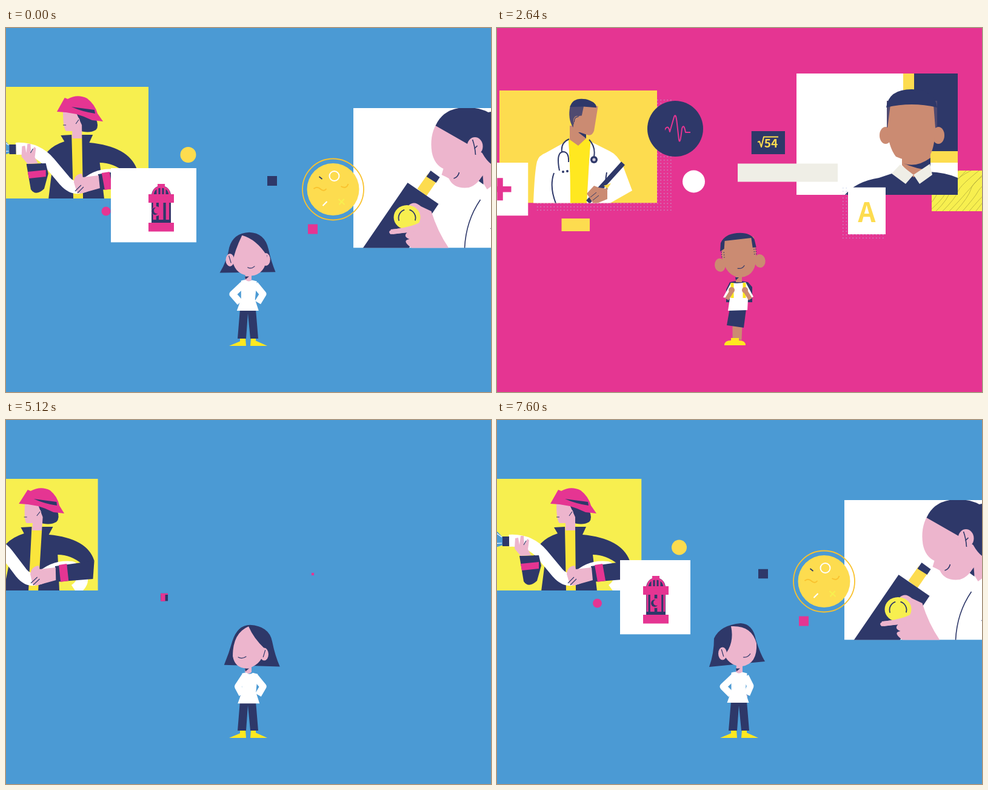
An HTML page with a canvas that plays this animation: 800 by 600 pixels, repeating every 7.68 s.

```html
<!DOCTYPE html>
<html lang="en">
<head>
<meta charset="utf-8">
<title>Future jobs</title>
<style>
html, body { margin: 0; width: 100%; height: 100%; overflow: hidden; background: #4b9ad4; }
canvas { display: block; }
</style>
</head>
<body>
<canvas id="stage" width="800" height="600"></canvas>
<script>
const g = document.getElementById('stage').getContext('2d');
const BLUE = '#4b9ad4', PINK = '#e53592', NAVY = '#2e3869', GOLD = '#fddc4f', LEMON = '#f7ef4f',
  SUN = '#ffe820', ROSE = '#edb5cd', BROWN = '#cb8b72', AMBER = '#f9c22e', PLUM = '#504a70',
  PAPER = '#efeee6', WHITE = '#fff';
const FONT = '"Noto Sans CJK SC", "Noto Sans CJK JP", sans-serif';
const LOOP = 7680, STEP = 80, SWAP = 4400;
g.lineJoin = 'round';

// Drawing helpers
const fill = (c, d) => { g.fillStyle = c; g.fill(new Path2D(d)); };
const line = (c, w, d) => { g.strokeStyle = c; g.lineWidth = w; g.stroke(new Path2D(d)); };
const box = (c, x, y, w, h) => { g.fillStyle = c; g.fillRect(x, y, w, h); };
const oval = (c, x, y, rx, ry = rx) => {
  g.fillStyle = c; g.beginPath(); g.ellipse(x, y, Math.max(rx, 0), Math.max(ry, 0), 0, 0, 7); g.fill();
};
const ring = (c, w, x, y, r, a = 0, b = 7) => {
  g.strokeStyle = c; g.lineWidth = w; g.beginPath(); g.arc(x, y, Math.max(r, 0), a, b); g.stroke();
};
const label = (c, size, x, y, text) => {
  g.font = `bold ${size}px ${FONT}`; g.textAlign = 'center'; g.fillStyle = c; g.fillText(text, x, y);
};
const group = fn => { g.save(); fn(); g.restore(); };
const move = (x, y, fn) => group(() => { g.translate(x, y); fn(); });
const turn = (x, y, deg, fn) => group(() => {
  g.translate(x, y); g.rotate(deg * Math.PI / 180); g.translate(-x, -y); fn();
});
const panel = (c, x, y, w, h, fn) => {
  if (w <= 0 || h <= 0) return;
  group(() => {
    g.beginPath(); g.rect(x, y, w, h); g.clip();
    box(c, x, y, w, h); fn();
  });
};
const dots = (x0, y0, x1, y1) => {
  for (let x = x0; x < x1; x += 5.5)
    for (let y = y0; y < y1; y += 5.5) box('rgba(185,195,230,.6)', x, y, 1.5, 1.5);
};

// Motion helpers: eased keys as time, value pairs, and blending of like paths
const key = (s, ...k) => {
  if (s <= k[0]) return k[1];
  for (let i = 2; i < k.length; i += 2) if (s < k[i]) {
    const p = (s - k[i - 2]) / (k[i] - k[i - 2]);
    return k[i - 1] + (k[i + 1] - k[i - 1]) * p * p * (3 - 2 * p);
  }
  return k[k.length - 1];
};
const NUM = /-?[\d.]+/g;
const mix = (a, b, k) => {
  const n = b.match(NUM);
  let i = 0;
  return a.replace(NUM, v => +v + (n[i++] - v) * k);
};

function girl(s) {
  const yaw = key(s, 1200, 0, 1520, -1, 2320, -1, 2640, 1, 3920, 1, 4000, .15, 4320, -.6);
  const pose = (l, f, r) => yaw < 0 ? mix(f, l, -yaw) : mix(f, r, yaw);
  const ear = (l, f, r, lean) => {
    const [x, y] = pose(l, f, r).split(',').map(Number);
    oval(ROSE, x, y, 7, 10.5);
    line(NAVY, 1.2, `M${x - 3 * lean},${y + 5} L${x + 3 * lean},${y - 7}`);
  };
  const settle = key(s, 240, 0, 800, 1);
  move(0, settle * 2.5, () => {
    fill(SUN, 'M368,521.5 L386,514 V509 H395 L396,521.5Z M431,521.5 L412,513 V509 H404 L403,521.5Z');
    fill(NAVY, 'M386,461 H412 L416,509.5 H403 L399,468 L396,509.5 H382Z');
    oval(ROSE, 382 + settle * 8, 455, 4); oval(ROSE, 418 - settle * 10, 453, 5, 4);
    fill(ROSE, 'M395,402 H405 V413 Q400,418 394,413Z');
    fill(NAVY, 'M394,407 H401 L395,412Z');
    const spread = settle * 2;
    line(WHITE, 11, pose('M394,420 L384,437 L390,450', `M391,420 L${376 - spread},436 L386,450`, 'M391,420 L373,437 L386,450'));
    line(WHITE, 11, pose('M411,421 L424,437 L416,451', `M411,420 L${423 + spread},436 L416,450`, 'M410,420 L418,436 L412,450'));
    move(-1.5 * yaw, yaw < 0 ? -1.5 * yaw : 0, () =>
      fill(WHITE, 'M388,414 Q394,412 396,413 Q400,417 406,413 L414,415 L411,445 L417,463.5 H381 L388,444Z'));
  });
  fill(NAVY, pose('M361,404 Q368,385 374,365 Q383,338 403,338 Q435,340 440,365 Q445,390 453,407Z',
    'M353,403 Q366,383 370,362 Q376,338 401,337 Q428,338 434,365 Q438,385 445,403Z',
    'M350,407 Q358,385 358,360 Q368,338 402,335 Q422,336 427,362 Q434,385 442,398Z'));
  ear('384,385', '369,382', '372,385', -.6);
  ear('425,387', '431,381', '416,385', .6);
  fill(ROSE, pose('M402,340 Q408,362 425,376 Q424,400 400,409 Q378,412 374,390 Q374,348 402,340Z',
    'M390,342 Q412,350 431,377 Q428,407 404,409 Q378,408 374,385 Q374,368 390,342Z',
    'M386,340 Q420,338 428,368 Q430,402 404,406 Q385,406 375,388 Q392,368 386,340Z'));
  line(NAVY, 1.2, pose('M380,390 Q387,394 394,389', 'M397,395 Q403,399 409,394', 'M406,391 Q414,392 418,385'));
}

function boy(s) {
  const walk = .5 - .5 * Math.cos((s - 4960) / 320 * Math.PI), rest = key(s, 6000, 0, 6600, 1);
  const pose = (a, b, c) => mix(mix(a, b, walk), c, rest);
  const shoe = (d, side) => {
    const [x, y] = d.split(',').map(Number);
    move(x, y, () => { g.scale(side, 1); fill(SUN, 'M0,0 V-12 H10 V-8 Q21,-8 21,0Z'); });
  };
  line(BROWN, 9, pose('M397,490 L398,514', 'M395,490 L396,514', 'M393,490 L393,514'));
  line(BROWN, 9, pose('M407,490 L408,516', 'M408,486 L407,510', 'M400,490 L399,514'));
  shoe(pose('407,521.5', '405,525', '396,523'), -1);
  shoe(pose('403,526', '400,519', '389,523'), 1);
  fill(NAVY, pose('M386,462 L414,462 L418,492 L389,494Z', 'M385,462 L414,461 L418,488 L388,494Z',
    'M384,462 L411,463 L407,494 L379,490Z'));
  move(-2 * rest, rest, () => {
    fill(NAVY, 'M386,418 Q400,414 416,418 L423,426 V451 H380 V430Z');
    fill(BROWN, 'M396,406 H406 V418 H396Z');
    fill(NAVY, 'M395,410 H401 L396,415Z');
    fill(WHITE, 'M388,419 Q400,421 412,418 L425,442 L416,446 L415,464 L383,465 L386,445 L375,443Z');
    line(SUN, 5, 'M390,419 V444 M410,419 V444');
    line(BROWN, 7, 'M381,446 L389,433 M420,446 L412,433');
    oval(BROWN, 389, 431, 5); oval(BROWN, 411, 431, 5);
  });
  move(-2 * rest, 0, () => turn(402, 412, key(s, 4960, 4, 5920, 3, 6640, -5), () => {
    oval(BROWN, 372, 388, 9, 11); oval(BROWN, 438, 387, 9, 11);
    fill(BROWN, 'M380,346 H431 L433,372 Q432,411 405,411 Q379,409 376,372Z');
    fill(NAVY, 'M374,366 L376,352 Q384,338 404,338 Q426,338 432,351 L434,364 L428,364 L427,348 L383,349 L381,362Z');
    for (const x of [376, 380, 430, 433])
      for (let y = 366; y < 378; y += 4) oval(NAVY, x, y + x % 3, .8);
    line(NAVY, 1.2, 'M400,396 Q408,398 412,392');
  }));
}

function firefighter(s) {
  const k = key(s, 1200, 1.2, 2240, 1, 3920, 0, 4000, -.13);
  g.transform(1, 0, -.06 * k, 1, 24 * k, 0);
  fill(BLUE, 'M-40,142 L10,194 V206 L-40,222Z');
  line(WHITE, 1.2, 'M-30,166 L8,193 M-30,205 L8,203');
  fill(NAVY, 'M118,141 L152,149 Q158,162 152,168 Q140,175 122,168Z');
  fill(ROSE, 'M98,137 L120,140 L129,160 V184 H113 V170 H103 Q98,166 98,137Z');
  oval(ROSE, 121, 154, 5, 7);
  line(NAVY, 1.1, 'M119,158 L124,151 M98,160 L103,160');
  fill(PINK, 'M88,138 L101,115 L106,117 Q122,108 138,116 Q151,126 155,141 L164,154 L146,152 Q118,138 88,138Z');
  fill(NAVY, 'M112,130 L150,135 L151,141 Q130,138 112,130Z');
  fill('#fae53c', 'M113,182 H130 L132,281 H111Z');
  fill(NAVY, 'M94,177 L112,176 L114,282 H73 L80,228 L60,228 Q66,198 100,187Z');
  fill(NAVY, 'M129,176 H147 L141,189 Q205,195 219,232 L200,238 Q180,222 158,222 L165,282 H130Z');
  line(WHITE, 20, 'M20,199 Q54,197 75,222 L100,252 Q114,268 132,261 Q152,240 182,243 Q215,262 190,280');
  fill(NAVY, 'M9,192 H20 V208 H9Z');
  fill(NAVY, 'M37,224 L69,223 L73,240 L66,265 Q52,278 44,266Z');
  fill(PINK, 'M39,237 L69,234 V245 L41,248Z');
  fill(NAVY, 'M155,241 L219,232 V262 L157,267Z');
  fill(PINK, 'M161,239 L174,237 L179,265 L166,267Z');
  fill(ROSE, 'M30,195 L35,194 L37,206 L39,191 L44,191 L45,206 L50,196 L53,198 L51,213 L56,223 L39,224 L29,212Z');
  fill(ROSE, 'M115,254 Q116,241 128,240 L130,246 L156,243 L158,264 L126,273 L120,271Z');
  line(NAVY, 1.1, 'M44,206 L48,199 M117,269 L127,259 M121,272 L131,262');
}

function hydrant(s, x) {
  const a = (s - 2240) / 672 * Math.PI;
  const nozzle = phase => {
    const sx = 23 * Math.cos(a + phase), front = Math.sin(a + phase);
    if (front < -.1) return;
    fill(PINK, `M${x},297 L${x + sx},297 V308 L${x},308Z`);
    oval(PINK, x + sx, 302, 4 + 4 * front, 8);
    if (front > .1) oval(NAVY, x + sx - 2, 302, 6 * front, 6);
    if (front > .1) oval(PINK, x + sx + 1, 301, 5 * front, 5);
  };
  box(NAVY, x - 16, 285, 32, 38);
  for (let i = 0; i < 4; i++) {
    const b = ((i + .5) / 4 * Math.PI + a) % (Math.PI / 4) + i * Math.PI / 4;
    const w = 7.5 * Math.sin(b);
    box(PINK, x - 15 * Math.cos(b) - w / 2, 288, w, 28);
  }
  nozzle(0); nozzle(Math.PI);
  fill(NAVY, `M${x - 16},275 Q${x - 14},261 ${x},260 Q${x + 14},261 ${x + 16},275Z`);
  line(PINK, 3, `M${x - 14},275 Q${x - 12},262 ${x},262 Q${x + 12},262 ${x + 14},275 M${x - 6},275 V263 M${x},275 V260 M${x + 6},275 V263`);
  box(PINK, x - 6, 257, 12, 5);
  box(PINK, x - 21, 274, 42, 14); box(PINK, x - 21, 321, 42, 14.5);
}

function scientist() {
  fill(ROSE, 'M700,200 L728,222 L736,248 L712,266 L698,243Z');
  fill(NAVY, 'M698,252 L705,243 L706,258Z');
  fill(GOLD, 'M718,261 L735,247 L764,242 V250 Q738,252 718,261Z');
  line(NAVY, 1.6, 'M735,254 Q750,249 764,249 M701,283 Q677,318 675,363 M727,320 L724,363 M718,330 L725,336');
  fill(ROSE, 'M628,159 Q617,178 621,205 Q625,225 640,232 L637,242 Q644,245 649,248 Q657,266 682,263 Q698,258 705,240 L712,200 L690,178Z');
  fill(NAVY, 'M627,161 Q640,132 676,131 Q700,131 714,139 Q732,134 740,147 Q748,159 764,157 V197 Q745,228 726,228 Q714,224 704,206 L690,197Z');
  oval(ROSE, 692, 195, 13, 15);
  line(NAVY, 1.6, 'M688,184 Q692,195 693,209 M691,199 L696,194 M657,248 Q664,246 666,238');
  fill(GOLD, 'M597,265 L614,241 L630,251 L612,277Z');
  fill(NAVY, 'M619,235 L634,246 L628,255 L612,245Z');
  fill(NAVY, 'M507,363 L581,255 L632,290 L583,363Z');
  fill(ROSE, 'M583,292 Q592,284 603,294 L620,302 Q630,335 649,363 H588 Q570,350 584,348 Q573,344 580,337 L553,340 Q547,335 556,332 L585,328Z');
  oval(LEMON, 580, 312, 22, 20);
  ring(NAVY, 1.8, 580, 313, 14, 2.8, 4.4); ring(NAVY, 1.8, 580, 313, 14, 5, 6.6);
  fill(ROSE, 'M553,332 Q585,329 602,320 L606,334 L556,340Z');
}

function pupil() {
  box(NAVY, 688, 75, 72, 128); box(GOLD, 670, 75, 18, 28); box(GOLD, 714, 203, 46, 19);
  fill(NAVY, 'M573,276 Q592,253 630,247 L660,237 H712 Q740,238 760,247 V276Z');
  fill(BROWN, 'M668,200 H715 V232 L687,246 L668,226Z');
  fill(NAVY, 'M668,222 Q690,232 715,214 V234 Q695,234 668,222Z');
  fill(PAPER, 'M651,240 L665,225 L687,242 L674,257Z M687,242 L714,224 L718,242 L697,257Z');
  oval(BROWN, 641, 177, 10, 14); oval(BROWN, 728, 177, 10, 14);
  fill(PLUM, 'M643,120 H726 V164 H643Z');
  fill(BROWN, 'M649,126 H720 L723,165 Q722,200 712,213 Q690,226 658,212 Q645,195 644,165Z');
  fill(NAVY, 'M642,131 Q646,101 684,101 Q722,101 726,131 Q684,121 642,131Z');
}

function doctor(s) {
  const k = key(s, 5920, 0, 6560, 1);
  const x1 = 213 - 5 * k, y1 = 246 - 29 * k, x2 = 186 - 36 * k, y2 = 286 - 5 * k;
  fill(WHITE, 'M60,283 Q62,230 66,214 Q69,204 80,200 L118,179 L124,283Z');
  fill(WHITE, mix('M154,181 L190,197 Q201,203 204,213 L222,283 L184,283 L148,283Z',
    'M154,181 L186,197 Q199,203 208,222 L223,262 L186,283 L148,283Z', k));
  fill(SUN, 'M118,178 H155 Q150,220 148,283 H121 Q121,220 118,178Z');
  fill(BROWN, 'M120,155 H147 V176 L134,188 L120,178Z');
  fill(NAVY, 'M134,166 H147 V176Z');
  turn(133, 180, 12 * k, () => {
    fill(BROWN, 'M128,121 L154,117 L156,158 Q155,168 146,167 L121,164 V140Z');
    fill(PLUM, 'M109,126 L131,122 V138 Q120,140 121,160 Q109,148 109,126Z');
    fill(NAVY, 'M109,128 Q110,111 132,110 Q150,111 152,120 L130,123Z');
    oval(BROWN, 124, 147, 5, 7);
    line(NAVY, 1.1, 'M121,151 Q119,142 126,141');
  });
  line(NAVY, 2, 'M119,177 Q105,183 107,198 M103,229 Q97,199 109,198 Q119,198 118,215 M152,178 Q163,190 160,206 M94,233 Q86,255 97,283 M181,232 Q177,252 182,260');
  oval(NAVY, 109, 231, 2); oval(NAVY, 116, 230, 2);
  oval(NAVY, 160, 211, 6); oval('#cfc9dd', 160, 211, 2.6);
  line(NAVY, 8, `M${x1},${y1} L${x2},${y2}`);
  if (k > .3) {
    fill(GOLD, `M${x2 + 26},${y2 - 27} L${x2 + 38},${y2 - 31} L${x2 + 32},${y2 - 22}Z`);
    fill(BROWN, `M${x2 - 2},${y2 - 14} L${x2 + 10},${y2 - 27} L${x2 + 18},${y2 - 24} L${x2 + 32},${y2 - 22} V${y2 - 5} L${x2 + 10},${y2 + 4}Z`);
    line(NAVY, 1, `M${x2 + 4},${y2 - 8} L${x2 + 14},${y2 - 16} M${x2 + 8},${y2 - 3} L${x2 + 18},${y2 - 11}`);
  }
}

function dish(s) {
  if (s < 2160 || s > 6240) return;
  const x = key(s, 4000, 539.5, 4900, 533, 5640, 533, 5920, 768, 6200, 880);
  const y = key(s, 2240, 186, 2640, 266), r = key(s, 2160, 4, 2240, 14, 2640, 50.5);
  ring(AMBER, r < 20 ? 1 : 1.8, x, y, r);
  const size = key(s, 2320, 0, 2800, 43);
  if (!size) return;
  move(x, y, () => {
    oval(GOLD, 0, 0, size);
    g.beginPath(); g.arc(0, 0, size, 0, 7); g.clip();
    if (s > 4500 && s < 5720) {
      ring(WHITE, 3.5, -17, -16, 16);
      line(AMBER, 3, 'M7,17 Q14,24 20,19 Q26,17 30,10');
      return;
    }
    g.translate(0, s > 5000 ? -20 : 0);
    ring(WHITE, 2, 2, -22, 8);
    line(AMBER, 2, 'M-32,-1 Q-26,-6 -20,0 Q-15,4 -11,-1 M13,-5 Q22,0 25,-9');
    line(NAVY, 1.8, 'M-23,-21 L-18,-17');
    line(WHITE, 2.2, 'M-17,27 L-10,20');
    move(s > 5000 ? 13 : 0, 5, () => line(LEMON, 2, 'M9,11 L19,20 M18,11 L10,20'));
  });
}

function leftSide(s) {
  const sun = key(s, 1440, 0, 1680, 12.5, 3920, 12.5, 4000, 13, 4960, 18.5);
  if (s < 4480) {
    const x = key(s, 1200, -245, 1600, 0, 3920, .5, 4000, -3, SWAP, -260);
    panel(LEMON, x - 20, 97, 258, 184, () => { g.translate(Math.min(x + 1, 0), 0); firefighter(s); });
    oval(PINK, key(s, 2240, 160, 3920, 165.5, 4000, 165, SWAP, 60), 302, key(s, 1520, 0, 1760, 7.5, 4000, 7.5, SWAP, 0));
  } else {
    const y = 97 + (s - 4960) / 1680 * 6;
    if (s > 4800) dots(66, 118, 289, 303);
    panel(GOLD, key(s, SWAP, -270, 4880, 4), y, 260, 185.5, () => {
      g.translate(key(s, SWAP, -274, 4880, 0), y - 97); doctor(s);
    });
    move(key(s, 4960, 306, 5920, 287.5, 6640, 294), 166, () => {
      oval(NAVY, 0, 0, key(s, 4480, 0, 4880, 46));
      g.setLineDash([key(s, 5640, 0, 5920, 46, 6400, 190), 400]);
      line(PINK, 2, 'M-31,5 H-19 Q-12,-10 -9,5 L-2,-19 Q1,-28 3,-8 L6,18 Q8,28 11,0 Q14,-10 17,6 H25');
      g.setLineDash([]);
      box(NAVY, -33, -4, key(s, 6160, 0, 6560, 16), 14);
    });
    box(GOLD, key(s, 4500, -60, 4960, 93, 5920, 102, 6640, 106.5), 314, 46.5, 21);
  }
  oval(s < SWAP ? GOLD : WHITE, key(s, 2240, 299.5, 4000, 300.5, 4960, 322.5, 5920, 320.5, 6640, 324.5),
    key(s, 2240, 214.5, 3920, 210, 4000, 209, 4960, 253.5, 5920, 245.5, 6640, 253), sun);

  // The card that holds the hydrant and later the cross
  const l = key(s, 1360, 261, 1760, 203, 3920, 203, 4000, 173, 4720, -57, 4960, -57, 5920, -42);
  const r = key(s, 1360, 261, 1760, 319, 3920, 319, 4000, 314, 4720, 65, 4960, 65, 5920, 51.5);
  const t = key(s, 1360, 292, 1760, 231, 4000, 231, 4960, 229.5, 5920, 237, 6640, 222);
  const b = key(s, 1360, 292, 1760, 353.5, 4000, 353.5, 4960, 354.5, 5920, 325, 6640, 309.5);
  panel(WHITE, l, t, r - l, b - t, () => {
    if (s < SWAP) return hydrant(s, key(s, 3920, 262, 4000, 256, SWAP, 150));
    const arm = key(s, 4960, 34, 5920, 18.5), w = arm / 3.9, y = (t + b) / 2;
    box(PINK, 5 - arm, y - w, arm * 2, w * 2); box(PINK, 5 - w, y - arm, w * 2, arm * 2);
  });
}

function rightSide(s) {
  const grow = key(s, 2160, 0, 2240, .05, 2640, 1);
  const x = key(s, 4000, 573, 4800, 495, 5680, 495, 5920, 494), y = key(s, 5640, 132, 5920, 118, 6480, 75);
  const w = key(s, 5680, 268, 5920, 266), h = key(s, 5680, 230.5, 5920, 229, 6480, 200);
  const swap = key(s, 5980, 0, 6440, 1);
  if (s > 4880 && s < 5600) dots(534, 363, 728, 378);
  if (s > 6080) panel(LEMON, key(s, 6100, 810, 6500, 717), 235, 90, 67, () => {
    for (let i = 0; i < 14; i++) {
      const o = i * 11;
      line('#b3ad3c', .8, `M${690 + o},303 Q${712 + o},${285 - i} ${716 + o},${265 + i % 3 * 5} T${755 + o},232`);
    }
  });
  panel(WHITE, x + w * .52 * (1 - grow), y + h / 2 * (1 - grow), w * grow, h * grow, () => {
    if (swap < 1) move(key(s, 4000, 81.5, 4800, 0, 5680, 0, 5920, -4), key(s, 5680, 0, 5920, -7) - swap * 260, scientist);
    if (swap > 0) move(0, y - 75 + (1 - swap) * 230, () => { box(WHITE, 494, 75, 266, 200); pupil(); });
  });
  dish(s);

  if (s < SWAP) {
    const p = key(s, 1360, 0, 1600, 8);
    box(PINK, 506 - p, key(s, 2240, 254, 2640, 331.5) - p, p * 2, p * 2);
  }
  const pop = key(s, 2320, 0, 2560, 1);
  const nx = key(s, 5920, 431, 6480, 419.5), ny = key(s, 2560, 245.5, 3920, 245.5, 4000, 244, 4880, 170);
  panel(NAVY, nx + 8 * (1 - pop), ny + 8 * (1 - pop), key(s, 5560, 16, 5900, 55.5) * pop, key(s, 5560, 16, 5900, 38) * pop, () => {
    if (s < 6080) return;
    g.globalAlpha = key(s, 6080, 0, 6400, 1);
    g.translate(nx - 419.5, 0);
    line(GOLD, 2, 'M430,188 L433,187 L436,196 L440,179.5 H464');
    label(GOLD, 19, 452, 197, '54');
  });
  if (s < 5880) return;
  const bar = key(s, 5920, 561, 6400, 397);
  box(PAPER, bar, 223.5, 562 - bar, 30);
  if (s > 6320) dots(570, 263, 640, 350);
  const cw = key(s, 5880, 13, 5920, 15, 6400, 62), ch = key(s, 5880, 13, 5920, 15, 6400, 77.5);
  panel(WHITE, 579, 340 - ch, cw, ch, () => {
    if (cw > 30) label(GOLD, 45, 610, 320, 'A');
  });
}

function draw(s) {
  box(BLUE, 0, 0, 800, 600);
  g.globalAlpha = key(s, 4240, 0, 4480, 1);
  box(PINK, 0, 0, 800, 600);
  g.globalAlpha = 1;
  if (s >= 1200) {
    move(key(s, 7300, 0, 7660, -380), 0, () => leftSide(s));
    move(key(s, 7300, 0, 7660, 420), 0, () => rightSide(s));
  }
  (s < SWAP ? girl : boy)(s);
}

// The story opens with the girl alone, 4000 ms after the loop's own start
const start = performance.now();
function tick() {
  const t = Math.floor(Math.max(0, performance.now() - start) / STEP) * STEP;
  draw((t + 4000) % LOOP);
  requestAnimationFrame(tick);
}
tick();
</script>
</body>
</html>
```
